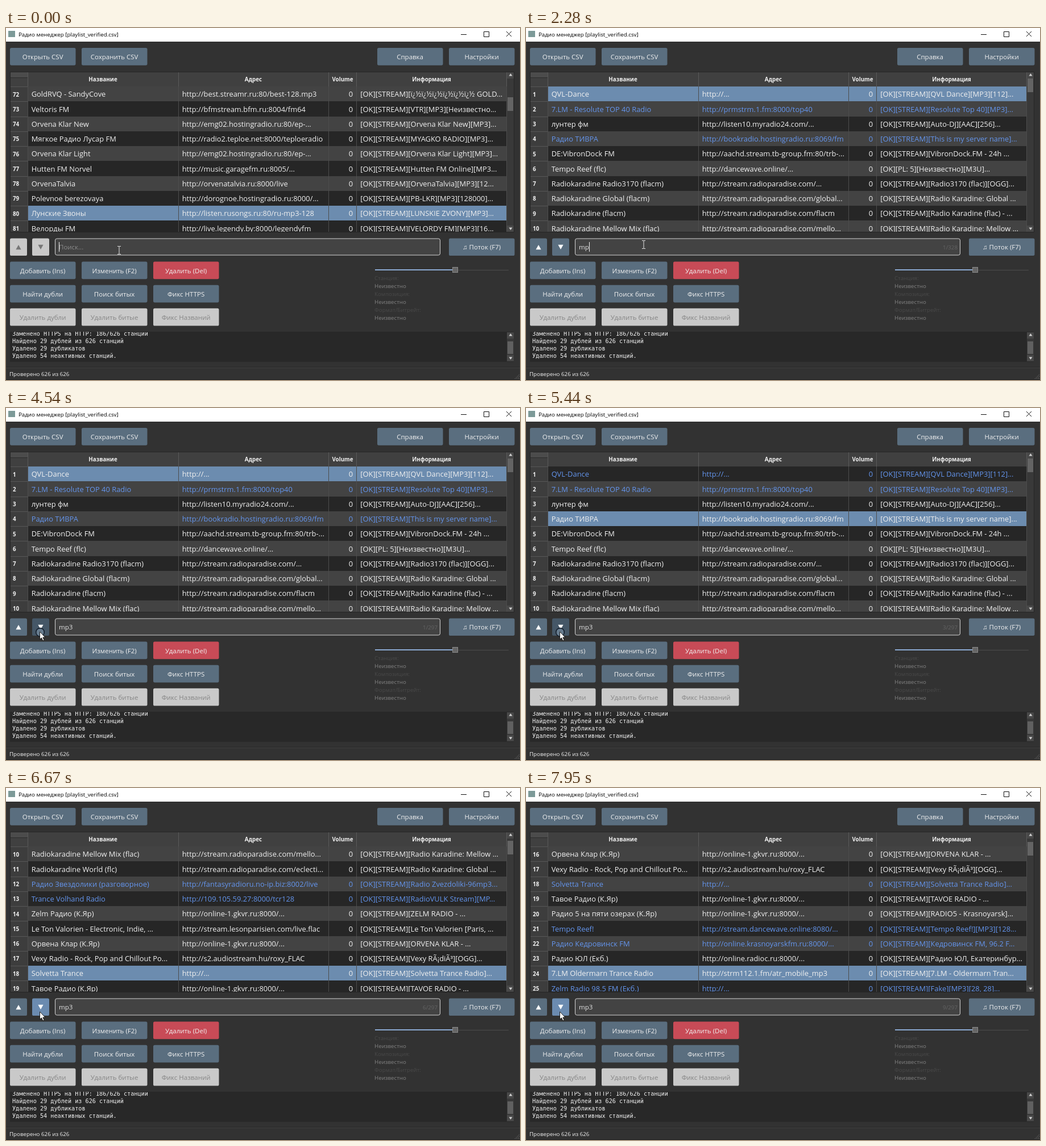
Animation, 904 px wide and 620 px high, one loop 8 s. Source, as an HTML page:

```html
<!DOCTYPE html>
<html lang="ru">
<head>
<meta charset="utf-8">
<title>Радио менеджер</title>
<style>
html, body { margin: 0; width: 100%; height: 100%; overflow: hidden; background: #323232; }
svg { display: block; width: 904px; height: 620px; }
text { font-family: "Open Sans", "Noto Sans", sans-serif; fill: #f0f0f0; white-space: pre; }
.cell { font-size: 12.9px; }
.ui { font-size: 11.5px; }
.small { font-size: 9.75px; }
.bold { font-size: 9.8px; font-weight: bold; }
.log { font: 10.18px "DejaVu Sans Mono", monospace; }
.mid { text-anchor: middle; }
.end { text-anchor: end; }
rect { shape-rendering: crispEdges; }
rect[rx] { shape-rendering: auto; }
</style>
</head>
<body>
<svg id="stage" viewBox="0 0 904 620"></svg>
<script>
const LOOP = 8000, ROW = 26.25, TOP = 103;
const BUTTON = '#5a6e7f', HOVER = '#6b8bb0', PRESSED = '#455767', OFF = '#c9c9c9', BLUE = '#6495ed';

// name | address | information, numbered from the given first row
const stations = {};
const list = (first, lines) => lines.trim().split('\n').forEach((line, i) => stations[first + i] = line.split('|'));
list(1, `
QVL-Dance|http://...|[QVL Dance][MP3][112]...
7.LM - Resolute TOP 40 Radio|http://prmstrm.1.fm:8000/top40|[Resolute Top 40][MP3]...
лунтер фм|http://listen10.myradio24.com/...|[Auto-DJ][AAC][256]...
Радио ТИВРА|http://bookradio.hostingradio.ru:8069/fm|[This is my server name]...
DE:VibronDock FM|http://aachd.stream.tb-group.fm:80/trb-...|[VibronDock.FM - 24h ...
Tempo Reef (flc)|http://dancewave.online/...|[PL: 5][Неизвестно][M3U]...
Radiokaradine Radio3170 (flacm)|http://stream.radioparadise.com/...|[Radio3170 (flac)][OGG]...
Radiokaradine Global (flacm)|http://stream.radioparadise.com/global...|[Radio Karadine: Global ...
Radiokaradine (flacm)|http://stream.radioparadise.com/flacm|[Radio Karadine (flac) - ...
Radiokaradine Mellow Mix (flac)|http://stream.radioparadise.com/mello...|[Radio Karadine: Mellow ...
Radiokaradine World (flc)|http://stream.radioparadise.com/eclecti...|[Radio Karadine: Global ...
Радио Звездолики (разговорное)|http://fantasyradioru.no-ip.biz:8002/live|[Radio Zvezdoliki-96mp3...
Trance Volhand Radio|http://109.105.59.27:8000/tcr128|[RadioVULK Stream][MP...
Zelm Радио (К.Яр)|http://online-1.gkvr.ru:8000/...|[ZELM RADIO - ...
Le Ton Valorien - Electronic, Indie, ...|http://stream.lesonparisien.com/live.flac|[Le Ton Valorien [Paris, ...
Орвена Клар (К.Яр)|http://online-1.gkvr.ru:8000/...|[ORVENA KLAR - ...
Vexy Radio - Rock, Pop and Chillout Po...|http://s2.audiostream.hu/roxy_FLAC|[Vexy RÃ¡diÃ³][OGG]...
Solvetta Trance|http://...|[Solvetta Trance Radio]...
Тавое Радио (К.Яр)|http://online-1.gkvr.ru:8000/...|[TAVOE RADIO - ...
Радио 5 на пяти озерах (К.Яр)|http://online-1.gkvr.ru:8000/...|[RADIO5 - Krasnoyarsk]...
Tempo Reef!|http://stream.dancewave.online:8080/...|[Tempo Reef!][MP3][128...
Радио Кедровинск FM|http://online.krasnoyarskfm.ru:8000/...|[Кедровинск FM, 96.2 F...
Радио ЮЛ (Екб.)|http://online.radioc.ru:8000/...|[Радио ЮЛ, Екатеринбур...
7.LM Oldermarn Trance Radio|http://strm112.1.fm/atr_mobile_mp3|[7.LM - Oldermarn Tran...
Zelm Radio 98.5 FM (Екб.)|http://...|[Fake][MP3][28, 28]...`);
list(72, `
GoldRVQ - SandyCove|http://best.streamr.ru:80/best-128.mp3|[${'ï¿½'.repeat(6)} GOLD...
Veltoris FM|http://bfmstream.bfm.ru:8004/fm64|[VTR][MP3][Неизвестно...
Orvena Klar New|http://emg02.hostingradio.ru:80/ep-...|[Orvena Klar New][MP3]...
Мягкое Радио Лусар FM|http://radio2.teploe.net:8000/teploeradio|[MYAGKO RADIO][MP3]...
Orvena Klar Light|http://emg02.hostingradio.ru:80/ep-...|[Orvena Klar Light][MP3]...
Hutten FM Norvel|http://music.garagefm.ru:8005/...|[Hutten FM Online][MP3...
OrvenaTalvia|http://orvenatalvia.ru:8000/live|[OrvenaTalvia][MP3][12...
Polevnoe berezovaya|http://dorognoe.hostingradio.ru:8000/...|[PB-LKR][MP3][128000]...
Лунские Звоны|http://listen.rusongs.ru:80/ru-mp3-128|[LUNSKIE ZVONY][MP3]...
Велорды FM|http://live.legendy.by:8000/legendyfm|[VELORDY FM][MP3][16...`);

const matches = new Set([1, 2, 4, 12, 13, 18, 21, 22, 24, 25]);

// press time, release time, selected row, first visible row
const clicks = [
  [4480, 4730, 2, 1], [5040, 5160, 4, 1], [5440, 5560, 12, 4], [5900, 6020, 13, 5],
  [6550, 6670, 18, 10], [6910, 7090, 21, 13], [7370, 7550, 22, 14], [7800, 7950, 24, 16]
];
const queries = [[0, ''], [1700, 'm'], [2280, 'mp'], [2870, 'mp3']];
const totals = { '': '', m: '572', mp: '328', mp3: '297' };
const carets = [[0, 1], [150, 0], [670, 1], [1170, 0], [1700, 1], [3430, 0], [3930, 1], [4480, 0]];
const pointer = [
  [0, 199, 391], [60, 202, 387], [100, 205, 383], [150, 207, 381],
  [3860, 202, 384], [3915, 184, 392], [3970, 158, 403], [4025, 130, 409], [4080, 104, 415],
  [4135, 84, 413], [4190, 69, 405], [4245, 62, 399], [4300, 60, 396], [4480, 59.5, 394]
];
const at = (table, t) => table.filter(step => step[0] <= t).pop();

const rect = (x, y, w, h, fill, more = '') => `<rect x="${x}" y="${y}" width="${w}" height="${h}" fill="${fill}" ${more}/>`;
const text = (x, y, s, cls, fill) => `<text x="${x}" y="${y}" class="${cls}"${fill ? ` style="fill:${fill}"` : ''}>${s}</text>`;
const path = (d, stroke, more = '') => `<path d="${d}" fill="none" stroke="${stroke}" ${more}/>`;
const poly = (points, fill, more = '') => `<polygon points="${points}" fill="${fill}" ${more}/>`;
const box = (x, y, w, fill) => rect(x, y, w, 30.7, fill, 'rx="2.6"');
const button = (x, y, label, fill = BUTTON, color) =>
  box(x, y, 115.5, fill) + text(x + 57.6, y + 20, label, 'ui mid', color);

function scrollbar(y, bottom) {
  const arrow = (cy, d) => rect(881, cy - 5, 12, 11, '#484848') +
    poly(`884.5,${cy + d} 890.5,${cy + d} 887.5,${cy - 2 * d}`, '#d0d0d0');
  return rect(881, y, 12, bottom - y, '#393939') + arrow(y + 5, 1.5) + arrow(bottom - 6, -1.5);
}

function frame() {
  const headings = [[170.5, 'Название'], [435, 'Адрес'], [592, 'Volume'], [748.5, 'Информация']];
  const log = ['Заменено HTTPS на HTTP: 186/626 станций', 'Найдено 29 дублей из 626 станций',
    'Удалено 29 дубликатов', 'Удалено 54 неактивных станций.'];
  const info = ['Станция:', 'Неизвестно', 'Композиция:', 'Неизвестно', 'Формат/Битрейт:', 'Неизвестно'];
  const titleBar = rect(0, 0, 904, 24, '#fff') + rect(4, 5, 12, 11, '#7d9a98') +
    text(22, 14.7, 'Радио менеджер [playlist_verified.csv]', 'small', '#000') +
    path('M800 11.5H810M840.5 6.5H849.5V15.5H840.5ZM880 6L889 15M889 6L880 15', '#111');
  const buttons = button(7, 35, 'Открыть CSV') + button(133, 35, 'Сохранить CSV') +
    button(653, 35, 'Справка') + button(779, 35, 'Настройки') + button(779, 370.4, '♫ Поток (F7)') +
    button(133, 411.5, 'Изменить (F2)') + button(259, 411.5, 'Удалить (Del)', '#c84b57') +
    button(7, 452.7, 'Найти дубли') + button(133, 452.7, 'Поиск битых') + button(259, 452.7, 'Фикс HTTPS') +
    ['Удалить дубли', 'Удалить битые', 'Фикс Названий'].map((s, i) => button(7 + 126 * i, 493.8, s, OFF, '#858585')).join('');
  const header = rect(7, 77, 887, 283, '#252525') + rect(8, 78, 873, 25, '#404040') +
    rect(8, 78, 30, 9, '#4c4c4c') + rect(8, 87, 30, 1, '#2c2c2c') +
    [38, 303, 567, 616, 880].map(x => rect(x, 78, 1, 25, '#5a5a5a')).join('') +
    headings.map(([x, s]) => text(x, 94.2, s, 'bold mid')).join('') + scrollbar(78, 359);
  const slider = rect(649, 426, 235, 1, '#4c4c4c') + rect(649, 425, 137, 2, '#8ba9d2') +
    rect(785, 421, 10, 10, '#8a8a8a') + rect(786, 422, 8, 8, '#656565');
  const labels = info.map((s, i) => text(648, 444 + 14 * i, s, 'small', i % 2 ? '#828282' : '#494949')).join('');
  const logView = rect(7, 535, 886, 53, '#282828') +
    `<g clip-path="url(#logClip)">${log.map((s, i) => text(11, 541.5 + 13.1 * i, s, 'log')).join('')}</g>` +
    scrollbar(536, 587) + rect(882, 552, 10, 22, '#606060');
  const status = rect(0, 597, 904, 1, '#272727') + rect(0, 598, 904, 1, '#414141') +
    text(6, 613.3, 'Проверено 626 из 626', 'small') + rect(0, 619, 904, 1, '#202020') +
    path('M895 618L903 610M898 618L903 613M901 618L903 616', '#777', 'stroke-dasharray="1.5 1.5"');
  return `<defs><clipPath id="rowClip"><rect x="8" y="103" width="873" height="256"/></clipPath>
    <clipPath id="logClip"><rect x="7" y="535" width="874" height="53"/></clipPath></defs>` +
    rect(0, 0, 904, 620, '#323232') + titleBar + buttons + header +
    '<g id="table"></g><g id="controls"></g>' + slider + labels + logView + status + '<g id="mouse"></g>';
}

function tableRows(top, selected, query) {
  let out = '';
  for (let i = 0; i < 10; i++) {
    const n = top + i, [name, address, info] = stations[n];
    const y = Math.round(TOP + ROW * i), base = TOP + ROW * i + 18.4;
    const found = query === 'm' || (query && matches.has(n));
    const color = found && n !== selected ? BLUE : '#f0f0f0';
    const fill = n === selected ? '#6c8caf' : n % 2 ? '#262626' : '#434343';
    out += rect(39, y, 842, 27, fill) + rect(8, y, 30, 27, '#3d3d3d') + rect(8, y, 30, 1, '#575757') +
      text(12, base - 0.8, n, 'bold') + text(44.7, base, name, 'cell', color) +
      text(309.7, base, address, 'cell', color) + text(610, base, '0', 'cell end', color) +
      text(623.3, base, '[OK]' + (n === 6 ? '' : '[STREAM]') + info, 'cell', color);
  }
  const grid = [38, 303, 567, 616, 880].map(x => rect(x, 103, 1, 256, '#4d4d4d')).join('');
  return `<g clip-path="url(#rowClip)">${out}${grid}</g>` +
    rect(882, 89 + Math.floor((top - 1) * 0.465), 10, 24, '#646464');
}

function controls(s) {
  const arrow = s.query ? '#fff' : '#777';
  const downFill = !s.query ? OFF : s.pressed ? PRESSED : s.overDown ? HOVER : BUTTON;
  return box(7, 370.4, 30, s.query ? BUTTON : OFF) + poly('22,382 26.6,390.3 17.4,390.3', arrow) +
    box(46, 370.4, 30, downFill) + poly('56.4,381.7 65.6,381.7 61,390', arrow) +
    button(7, 411.5, 'Добавить (Ins)', s.overAdd ? HOVER : BUTTON) +
    rect(86.5, 371, 677, 29, '#434343', 'rx="3" stroke="#d4d4d4"') +
    `<text id="query" x="93" y="390" class="ui" style="fill:${s.query ? '#e4e4e4' : '#8c8c8c'}">${s.query || 'Поиск...'}</text>` +
    (s.query ? text(759, 389.5, `${s.index}/${totals[s.query]}`, 'small end', '#646464') : '');
}

function mouse(x, y, inField, pressed) {
  if (inField) return path(`M${x - 3} ${y - 6.5}h2.5l.5 .5l.5 -.5h2.5M${x} ${y - 6}v13M${x - 3} ${y + 7.5}h2.5l.5 -.5l.5 .5h2.5`, '#e6e6e6');
  const ring = pressed ? '<circle cx="60" cy="395" r="7.3" fill="#667b8e" stroke="#111b27" stroke-width="1.5"/>' : '';
  return ring + `<g transform="translate(${x} ${y})">` +
    poly('0,0 0,13.5 3,10.8 5.3,16 7.6,15 5.3,10 9.4,10', '#fff', 'stroke="#111" stroke-width=".9"') + '</g>';
}

const stage = document.getElementById('stage');
stage.innerHTML = frame();
const shown = {};
function paint(id, markup) {
  if (shown[id] === markup) return;
  shown[id] = markup;
  document.getElementById(id).innerHTML = markup;
}

function draw(t) {
  const query = at(queries, t)[1];
  const done = clicks.filter(c => c[1] <= t);
  const [, , selected, top] = done.length ? done[done.length - 1] : query ? [0, 0, 1, 1] : [0, 0, 80, 72];
  const pressed = clicks.some(c => c[0] <= t && t < c[1]);
  const [, x, y] = at(pointer, t);
  const inside = (left, upper, w, h) => x >= left && x <= left + w && y >= upper && y <= upper + h;
  paint('table', tableRows(top, selected, query));
  paint('controls', controls({
    query, pressed, index: done.length + 1,
    overDown: inside(46, 370, 30, 31), overAdd: inside(7, 411, 116, 31)
  }));
  const width = query ? document.getElementById('query').getComputedTextLength() : 0;
  const caret = at(carets, t)[1] ? rect(Math.round(93 + width), 377, 1, 17, '#f0f0f0') : '';
  paint('mouse', caret + mouse(x, y, inside(86, 371, 678, 29), pressed));
}

const start = performance.now();
function tick() {
  draw((performance.now() - start) % LOOP);
  requestAnimationFrame(tick);
}
tick();
</script>
</body>
</html>
```
